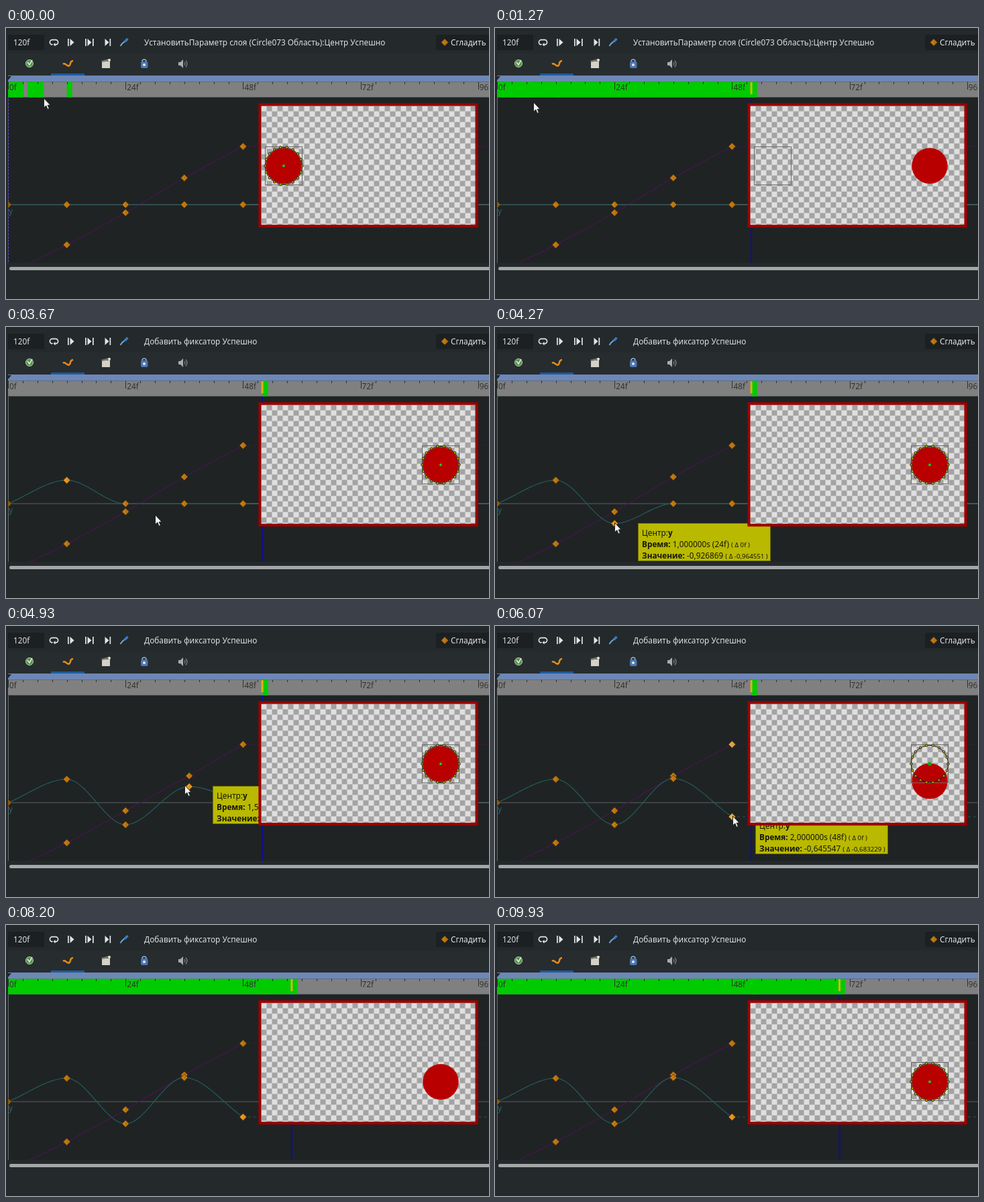
These frames come from a looping animation (720x405 px, 9.99 s). An HTML page with a canvas:

```html
<!DOCTYPE html>
<html lang="ru">
<head>
<meta charset="utf-8">
<title>Graph editor</title>
<style>
html, body { margin: 0; width: 100%; height: 100%; overflow: hidden; background: #24292b; }
canvas { display: block; width: 720px; height: 405px; }
</style>
</head>
<body>
<canvas id="stage" width="720" height="405"></canvas>
<script>
const LOOP = 9990;
const c = document.getElementById('stage').getContext('2d');
const FONT = '"Noto Sans", "Open Sans", sans-serif';
const X0 = 3, STEP = 7.3, AXIS = 264, SCALE = 1.232;
const TEXT = 11.8;
const frameX = f => X0 + f * STEP;

// Timed key points: [ms, value, value...]
const cursorKeys = [[0, 56, 105], [1270, 57, 111], [1500, 57, 112], [2100, 90, 262], [2200, 90, 262],
  [2800, 90, 228], [3150, 110, 240], [3670, 222, 281], [3900, 178, 263], [3950, 178, 263],
  [4350, 178, 296], [4650, 264, 263], [4700, 264, 263], [4930, 266, 238], [5200, 264, 227],
  [5560, 353, 263], [5650, 353, 263], [6070, 354, 284], [6200, 354, 286], [6300, 354, 286], [6550, 440, 240]];
const dragKeys = [
  [[0, AXIS]],
  [[2200, 264], [2800, 229]],
  [[3950, 264], [4350, 297]],
  [[4700, 264], [4930, 240], [5200, 228]],
  [[5650, 264], [6040, 285], [6110, 285], [6200, 287]]
];
const xValues = [367, 324, 276, 224, 177];

const ease = u => u * u * (3 - 2 * u);
function track(keys, t) {
  if (t <= keys[0][0]) return keys[0].slice(1);
  for (let i = 1; i < keys.length; i++) {
    const a = keys[i - 1], b = keys[i];
    if (t < b[0]) {
      const u = ease((t - a[0]) / (b[0] - a[0]));
      return a.slice(1).map((v, k) => v + (b[k + 1] - v) * u);
    }
  }
  return keys[keys.length - 1].slice(1);
}

// Clamped tangents: flat at extremes, averaged elsewhere
function tangent(pts, i) {
  const n = pts.length - 1;
  if (i === 0) return pts[1].y - pts[0].y;
  if (i === n) return pts[n].y - pts[n - 1].y;
  const a = pts[i].y - pts[i - 1].y, b = pts[i + 1].y - pts[i].y;
  return a * b <= 0 ? 0 : (a + b) / 2;
}
function valueAt(pts, f) {
  const last = pts.length - 1;
  if (f >= pts[last].f) return pts[last].y;
  let i = 0;
  while (f >= pts[i + 1].f) i++;
  const a = pts[i], b = pts[i + 1], u = (f - a.f) / (b.f - a.f), s = ease(u), v = 1 - u;
  return a.y * (1 - s) + b.y * s + tangent(pts, i) * u * v * v - tangent(pts, i + 1) * u * u * v;
}

function rect(x, y, w, h, color) { c.fillStyle = color; c.fillRect(x, y, w, h); }
function stroke(points, color, width = 1, dash = []) {
  c.strokeStyle = color; c.lineWidth = width; c.setLineDash(dash);
  c.beginPath();
  points.forEach(([x, y]) => c.lineTo(x, y));
  c.stroke();
  c.setLineDash([]);
}
function fillPoly(points, color, edge) {
  c.beginPath();
  points.forEach(([x, y]) => c.lineTo(x, y));
  c.closePath();
  c.fillStyle = color; c.fill();
  if (edge) { c.strokeStyle = edge; c.lineWidth = 1; c.stroke(); }
}
function disc(x, y, r, color, edge) {
  c.beginPath(); c.arc(x, y, r, 0, Math.PI * 2);
  c.fillStyle = color; c.fill();
  if (edge) { c.strokeStyle = edge; c.lineWidth = 1; c.stroke(); }
}
function text(s, x, y, color, size = TEXT, weight = 400) {
  c.font = `${weight} ${size}px ${FONT}`;
  c.fillStyle = color;
  c.fillText(s, x, y);
  return x + c.measureText(s).width;
}
function diamond(x, y, fill = '#c47d14') {
  fillPoly([[x, y - 5.2], [x + 5.2, y], [x, y + 5.2], [x - 5.2, y]], fill, '#5c3905');
  fillPoly([[x, y - 3], [x + 3, y], [x, y + 3]], 'rgba(70,40,0,.15)');
}

function makeChecker() {
  const tile = document.createElement('canvas');
  tile.width = tile.height = 16;
  const g = tile.getContext('2d');
  g.fillStyle = '#dfdfdf'; g.fillRect(0, 0, 16, 16);
  g.fillStyle = '#a3a3a3'; g.fillRect(8, 0, 8, 8); g.fillRect(0, 8, 8, 8);
  return c.createPattern(tile, 'repeat');
}
const checker = makeChecker();

function toolbar(message) {
  rect(0, 0, 720, 405, '#24292b');
  rect(3, 10, 54, 23, '#1c2022');
  text('120f', 11, 26, '#dfe1e2');
  const ink = '#e2e4e5';
  c.strokeStyle = ink; c.lineWidth = 1.7;
  c.beginPath();
  c.moveTo(69, 25); c.arc(69, 21.3, 3.6, Math.PI / 2, -Math.PI / 2);
  c.lineTo(74, 17.7); c.arc(74, 21.3, 3.6, -Math.PI / 2, Math.PI / 2);
  c.lineTo(73, 25); c.stroke();
  fillPoly([[73.5, 22], [73.5, 27.5], [70.5, 24.8]], ink);
  const arrow = x => fillPoly([[x, 16], [x + 6, 21.5], [x, 27]], ink);
  rect(92, 16, 1.7, 11, ink); arrow(95.5);
  rect(118, 16, 1.7, 11, ink); arrow(121.5); rect(129, 16, 1.7, 11, ink);
  arrow(147.5); rect(154.5, 16, 1.7, 11, ink);
  stroke([[170.5, 27], [173, 23.5], [177, 20]], '#6ea6d8', 2);
  stroke([[177, 20.5], [181.5, 16]], '#3b7cc2', 3.5);
  text(message, 206, 26, '#dfe1e2');
  c.beginPath(); c.roundRect(641, 10, 90, 23, 3);
  c.fillStyle = '#1c2022'; c.fill();
  diamond(654, 21.5);
  text('Сгладить', 663, 26, '#e2e4e5');
}

function tabs() {
  rect(3, 38, 717, 33, '#272c2e');
  disc(35, 53, 5.5, '#52934d', '#b9d0ac');
  stroke([[32, 51], [35, 55], [39, 48]], '#e1eadb', 1.6);
  c.strokeStyle = '#e58c1d'; c.lineWidth = 2.6;
  c.beginPath(); c.moveTo(85, 54);
  c.bezierCurveTo(89, 51, 90, 58, 94, 56.5);
  c.bezierCurveTo(97.5, 55, 94, 49.5, 100, 49); c.stroke();
  rect(67, 68, 50, 3, '#1d5b9e');
  rect(143, 50, 12, 10, '#d3d1c8');
  fillPoly([[142, 49], [154, 46], [155, 49], [143, 51]], '#77776f');
  disc(154, 48, 2, '#e9e4cf');
  c.strokeStyle = '#8caed8'; c.lineWidth = 1.6;
  c.beginPath(); c.arc(206, 50, 3, Math.PI, 0); c.stroke();
  c.beginPath(); c.roundRect(201, 50, 10.5, 10, 2);
  c.fillStyle = '#4d76b0'; c.fill();
  disc(206, 55, 2, '#e2ebf5');
  fillPoly([[257, 51], [260, 51], [264, 47], [264, 60], [260, 56], [257, 56]], '#a8acae');
  c.strokeStyle = '#7d8587'; c.lineWidth = 1.3;
  for (const r of [3, 6]) { c.beginPath(); c.arc(264, 53.5, r, -0.9, 0.9); c.stroke(); }
}

function ruler(state) {
  rect(3, 71, 717, 9.5, '#6d87b6');
  fillPoly([[3, 72], [8, 72], [3, 78]], '#20252a');
  rect(3, 80.5, 717, 23, '#808080');
  for (const [from, to] of state.cached) rect(frameX(from), 80.5, (to - from) * STEP, 23, '#00cb00');
  for (let f = 0; f <= 96; f += 3) {
    const major = f % 24 === 0;
    rect(Math.round(frameX(f)), 80.5, 1, major ? 11.5 : 3.5, '#2d302d');
    if (major) text(f + 'f', frameX(f) + 2, 93, '#303330');
  }
  if (state.head > 0) rect(frameX(state.head) - 2, 81, 3, 18, '#d8b512');
}

function curve(pts, color) {
  const line = [];
  for (let f = 0; f <= 48; f += 0.5) line.push([frameX(f), valueAt(pts, f)]);
  stroke(line, color, 1.2);
}

function graph(state) {
  c.save();
  c.beginPath(); c.rect(3, 104, 717, 247); c.clip();
  rect(3, 104, 717, 247, '#1f2324');
  rect(3, AXIS - 0.5, 717, 1, '#5c6062');
  rect(3, 104, 1, 247, '#666b6d');
  if (state.head === 0) stroke([[3.5, 104], [3.5, 351]], '#3a2b9c', 1, [3, 2]);
  else rect(frameX(state.head) - 1.6, 104, 2.2, 247, '#10108c');
  curve(state.xs, '#48154f');
  curve(state.ys, '#225c58');
  const end = state.ys[4].y, flat = end === AXIS;
  stroke([[353, 177], [720, 177]], '#48154f', 1, [4, 4]);
  stroke([[353, end], [720, end]], flat ? '#496d6b' : '#285450', 1, flat ? [] : [4, 4]);
  text('y', 4, 278, '#27666d');
  state.xs.forEach((p, i) => diamond(frameX(p.f), p.y, state.drag === 4 && i === 4 ? '#e8ac50' : undefined));
  state.ys.forEach((p, i) => {
    const fill = i === 0 ? '#96620f' : i === state.selected ? (state.drag === 4 ? '#e9b652' : '#f29b20') : undefined;
    diamond(frameX(p.f), p.y, fill);
  });
  if (state.drag) tooltip(state.ys[state.drag], state.drag * 12);
  c.restore();
  c.beginPath(); c.roundRect(5, 357, 730, 5, 2.5);
  c.fillStyle = '#a5a7a8'; c.fill();
}

const decimal = v => v.toFixed(6).replace('.', ',');
function tooltip(p, startFrame) {
  const x = Math.round(frameX(p.f)) + 35, y = Math.round(p.y) - 1;
  const delta = -(p.y - AXIS) * 0.683229 / 21;
  rect(x, y, 198, 57, '#6f7106');
  rect(x + 1, y + 1, 196, 55, '#b9b900');
  const ink = '#16170b', left = x + 6;
  let end = text('Центр:', left, y + 19, ink);
  text('y', end, y + 19, ink, TEXT, 700);
  end = text('Время: ', left, y + 36, ink, TEXT, 700);
  end = text(`${decimal(p.f / 24)}s (${p.f}f) `, end, y + 36, ink);
  text(`( Δ ${p.f - startFrame}f )`, end, y + 36, ink, 9.7);
  end = text('Значение: ', left, y + 53, ink, TEXT, 700);
  end = text(decimal(0.037682 + delta) + ' ', end, y + 53, ink);
  text(`( Δ ${decimal(delta)} )`, end, y + 53, ink, 9.7);
}

function box(x, y) {
  c.strokeStyle = '#69696b'; c.lineWidth = 1;
  c.strokeRect(Math.round(x) - 27.5, Math.round(y) - 28.5, 55, 57);
}
function handles(x, y, detached) {
  box(x, y);
  c.strokeStyle = '#191919'; c.lineWidth = 1;
  c.beginPath(); c.arc(x, y, 27.5, 0, Math.PI * 2); c.stroke();
  for (let i = 0; i < 18; i++) {
    const a = i * Math.PI / 9;
    disc(x + 27.5 * Math.cos(a), y + 28 * Math.sin(a), 1.8, i % 3 === 0 ? '#c98d12' : '#b4b400', '#2c2c08');
  }
  if (detached) rect(x - 2.5, y - 2.5, 5, 5, '#16a016');
  else disc(x, y, 2, '#00d020');
}

function preview(state) {
  rect(376.4, 112.4, 327.4, 185.8, '#9b0000');
  c.save();
  c.translate(380.5, 116.5);
  c.fillStyle = checker; c.fillRect(0, 0, 319, 177.5);
  c.restore();
  const x = 648 - (valueAt(state.xs, state.head) - 177) * SCALE;
  const y = 206 + (valueAt(state.ys, state.head) - AXIS) * SCALE;
  if (state.playing === 1) box(414, 206);
  disc(x, y, 26.7, '#b90000');
  if (!state.playing) {
    if (state.drag === 4) handles(648, 206, true);
    else handles(x, y, false);
  }
}

function cursor(t) {
  if (t >= 6400) return;
  const [x, y] = track(cursorKeys, t);
  c.save();
  c.translate(x, y);
  fillPoly([[0.5, 0], [0.5, 14], [3.8, 11], [6, 16.5], [8.4, 15.4], [6.2, 10.4], [10, 10]], '#f5f5f5', '#222');
  c.restore();
}

function stateAt(t) {
  const s = { head: 0, playing: 0, drag: 0, selected: 0 };
  if (t < 70) s.cached = [[0, 3.2], [4, 7.3], [12, 13.1]];
  else if (t < 2200) {
    s.head = Math.min(52, Math.floor((t - 70) * 52 / 1190));
    s.playing = t < 1400 ? 1 : 0;
    s.cached = [[0, s.head + 1.1], [4, 7.3], [12, 13.1]];
  } else if (t < 6480) {
    s.head = 52;
    s.cached = [[52, 53.1]];
  } else {
    s.head = Math.min(70, Math.floor(29.2 + (t - 7330) * 0.0342));
    s.playing = t < 8530 ? 2 : 0;
    s.cached = [[0, s.head + 1.1], [52, 53.1]];
  }
  dragKeys.forEach((keys, i) => {
    if (!i || t < keys[0][0]) return;
    s.selected = i;
    if (t < keys[keys.length - 1][0]) s.drag = i;
  });
  const column = i => i * 12 + (i === 3 && t >= 4820 && t < 5100 ? 1 : 0);
  s.xs = xValues.map((y, i) => ({ f: column(i), y }));
  s.ys = dragKeys.map((keys, i) => ({ f: column(i), y: track(keys, t)[0] }));
  return s;
}

function draw(t) {
  const state = stateAt(t);
  toolbar(t < 2300 ? 'УстановитьПараметр слоя (Circle073 Область):Центр Успешно' : 'Добавить фиксатор Успешно');
  tabs();
  ruler(state);
  graph(state);
  preview(state);
  cursor(t);
}

const start = performance.now();
function tick() {
  draw((performance.now() - start) % LOOP);
  requestAnimationFrame(tick);
}
tick();
</script>
</body>
</html>
```
